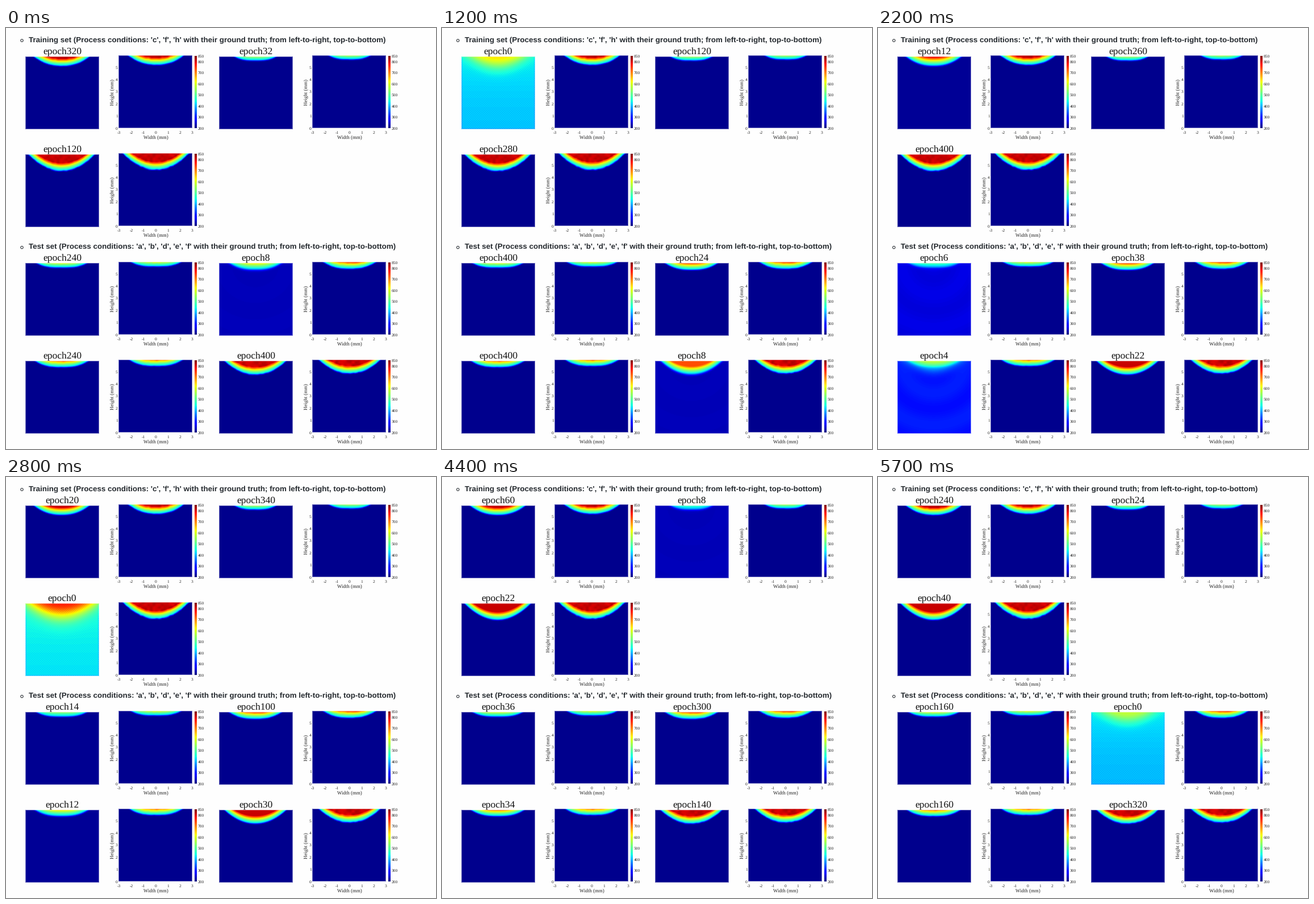
Recreate the animation shown at these times as a matplotlib script. Size 757 by 740 pixels, loop 8.8 s.

```python
import numpy as np
import matplotlib.pyplot as plt
from matplotlib.animation import FuncAnimation
from matplotlib.patches import Circle

W, H, DPI = 757, 740, 100
PX = 72 / DPI
FRAMES, STEP_MS, LAST = 88, 100, 57
NX, NY = 130, 128
COLD, HOT = 209, 808
EPOCHS = [*range(0, 41, 2), *range(60, 461, 20)]

plt.rcParams["text.hinting"] = "none"
fig = plt.figure(figsize=(W / DPI, H / DPI), dpi=DPI, facecolor="#fefefe")
ax = fig.add_axes([0, 0, 1, 1])
X, Y = np.meshgrid(np.arange(NX) + 0.5, np.arange(NY) + 0.5)
RIM = np.minimum(np.minimum(X, NX - X), np.minimum(Y, NY - Y))
SOFT_EDGE = np.where(RIM < 1, 0.55, 1.0)
MESH = np.cos(np.pi * (X - 0.5) / 2) * np.cos(np.pi * (Y - 0.5) / 2)


def ramp(x, x0, x1, a, b):
    return a + (b - a) * np.clip((x - x0) / (x1 - x0), 0, 1)


def smooth_noise(seed, cell=4.5):
    """Coarse random cells, interpolated to the field grid."""
    ny, nx = int(NY / cell), int(NX / cell)
    cells = np.random.default_rng(seed).uniform(-1, 1, (ny, nx))
    wide = np.array([np.interp(X[0], np.linspace(0, NX, nx), r) for r in cells])
    return np.array([np.interp(Y[:, 0], np.linspace(0, NY, ny), c) for c in wide.T]).T


class Pool:
    """Melt pool hanging from the top edge; deeper pools are hotter."""

    def __init__(self, half, depth, seed):
        self.half, self.depth = half, depth
        self.peak = 270 + 40 * depth
        self.power = 2 + 0.35 * (half / depth - 2)
        self.noise = smooth_noise(seed)

    def settled(self, centre, rough=1, base=COLD, cap=HOT, gain=1, width=1.2):
        noise = rough * self.noise
        v = Y / self.depth + (np.abs(X - centre) / self.half) ** self.power
        v = v + 0.025 * noise
        rise = np.clip(1 - v, 0, 1) ** 1.3 * (1 + 0.15 * noise)
        hot = 400 + (self.peak * gain - 400) * rise
        hot = np.minimum(hot, cap + 20 * noise)
        inside = 0.5 + 0.5 * np.tanh((1 - v) * self.depth / width)
        return base + (hot - base) * inside

    def predicted(self, e, centre=64):
        """Temperature predicted after e epochs."""
        bg = COLD + 185 * np.exp(-(e / 4.8) ** 1.4)
        early = max(0, 1 - e / 4)
        base = bg + early * (40 * np.exp(-Y / 50) + 0.04 * (self.peak - 700))
        if e >= 4:
            base = base + 0.08 * (bg - COLD) * np.cos(np.hypot(X - centre, Y) / 9)
        sharp = self.settled(centre, ramp(e, 24, 120, 0, 0.8), base,
                             ramp(e, 4, 14, 690, HOT), ramp(e, 4, 20, 0.78, 1),
                             ramp(e, 6, 14, 2.5, 1.2))
        if e >= 6:
            return sharp
        v = Y / (0.45 * self.depth + 11) + ((X - centre) / self.half) ** 2
        top = ramp(self.peak, 550, 1450, 520, 770) + 10 * e
        soft = base + (top - base) * np.exp(-0.9 * v ** 2)
        soft = soft + early * (10 * MESH - 20 * (RIM < 2) * (Y > 2))
        return soft + (sharp - soft) * ramp(e, 2, 6, 0, 1)


def show(field, x, y, w=NX, h=NY, alpha=None):
    return ax.imshow(field, cmap="jet", vmin=200, vmax=850, alpha=alpha,
                     extent=(x, x + w, y + h, y), aspect="auto")


def label(x, y, s, px, ha="center", family="Liberation Serif", color="#222222", **kw):
    return ax.text(x, y, s, fontsize=px * PX, ha=ha, family=family, color=color, **kw)


def truth_plot(x, y, field):
    show(field, x - 1, y - 1, alpha=SOFT_EDGE)
    show(np.linspace(850, 200, NY)[:, None], x + 133, y, 4, 127)
    for i in range(7):
        label(x + 21.5 * i, y + 137, str(i - 3), 7.5)
    for i in range(6):
        label(x - 2.3, y + 129.5 - 21.4 * i, str(i), 7.5, "right")
    for t in [*range(200, 801, 100), 850]:
        label(x + 138.7, y + 2.8 + 127 * (850 - t) / 650, str(t), 7.5, "left")
    label(x + 65, y + 146.3, "Width (mm)", 8.85)
    label(x - 11, y + 64, "Height (mm)", 8.85, va="center", rotation=90)


def heading(y, name, cases):
    text = (f"{name} set (Process conditions: {cases} with their ground truth; "
            "from left-to-right, top-to-bottom)")
    label(40, y, text, 13.33, "left", "Liberation Sans", "#24292e", weight="bold")
    ax.add_patch(Circle((28, y - 3), 2.2, fill=False, ec="#24292e", lw=0.75))


heading(25, "Training", "'c', 'f', 'h'")
heading(388.7, "Test", "'a', 'b', 'd', 'e', 'f'")

# column, row, first epoch, phase, half width, depth
PANELS = [
    (0, 0, 320, 0, 49.5, 17),
    (1, 0, 32, 2, 37.5, 7.5),
    (0, 1, 120, 0, 59, 29.5),
    (0, 2, 240, 2, 45, 8.5),
    (1, 2, 8, 1, 47, 12.5),
    (0, 3, 240, 0, 47.5, 11.5),
    (1, 3, 400, 1, 55, 24.5),
]

views = []
for col, row, first, phase, half, depth in PANELS:
    x, y = 341 * col, 172 * row + 19 * (row > 1)
    y -= 172 * (row > 1) - 172 * (row > 1)
    y = 172 * (row % 2) + 363 * (row // 2)
    pool = Pool(half, depth, seed=len(views) + 3)
    truth_plot(x + 199, y + 49, pool.settled(centre=66))
    img = show(np.full((NY, NX), COLD), x + 34, y + 50, alpha=SOFT_EDGE)
    title = label(x + 99, y + 46.5, "", 17.5, color="#111111")
    views.append((img, title, pool, 3 * EPOCHS.index(first) + phase))

ax.set(xlim=(0, W), ylim=(H, 0))
ax.axis("off")


def update(i):
    n = min(i, LAST)
    for img, title, pool, offset in views:
        # every panel advances two epochs in three frames
        e = EPOCHS[(offset + 2 * n) // 3 % len(EPOCHS)]
        img.set_data(pool.predicted(e))
        title.set_text(f"epoch{e}")
    return [a for v in views for a in v[:2]]


anim = FuncAnimation(fig, update, frames=FRAMES, interval=STEP_MS,
                     repeat=True, repeat_delay=0, blit=False)
plt.show()
```
